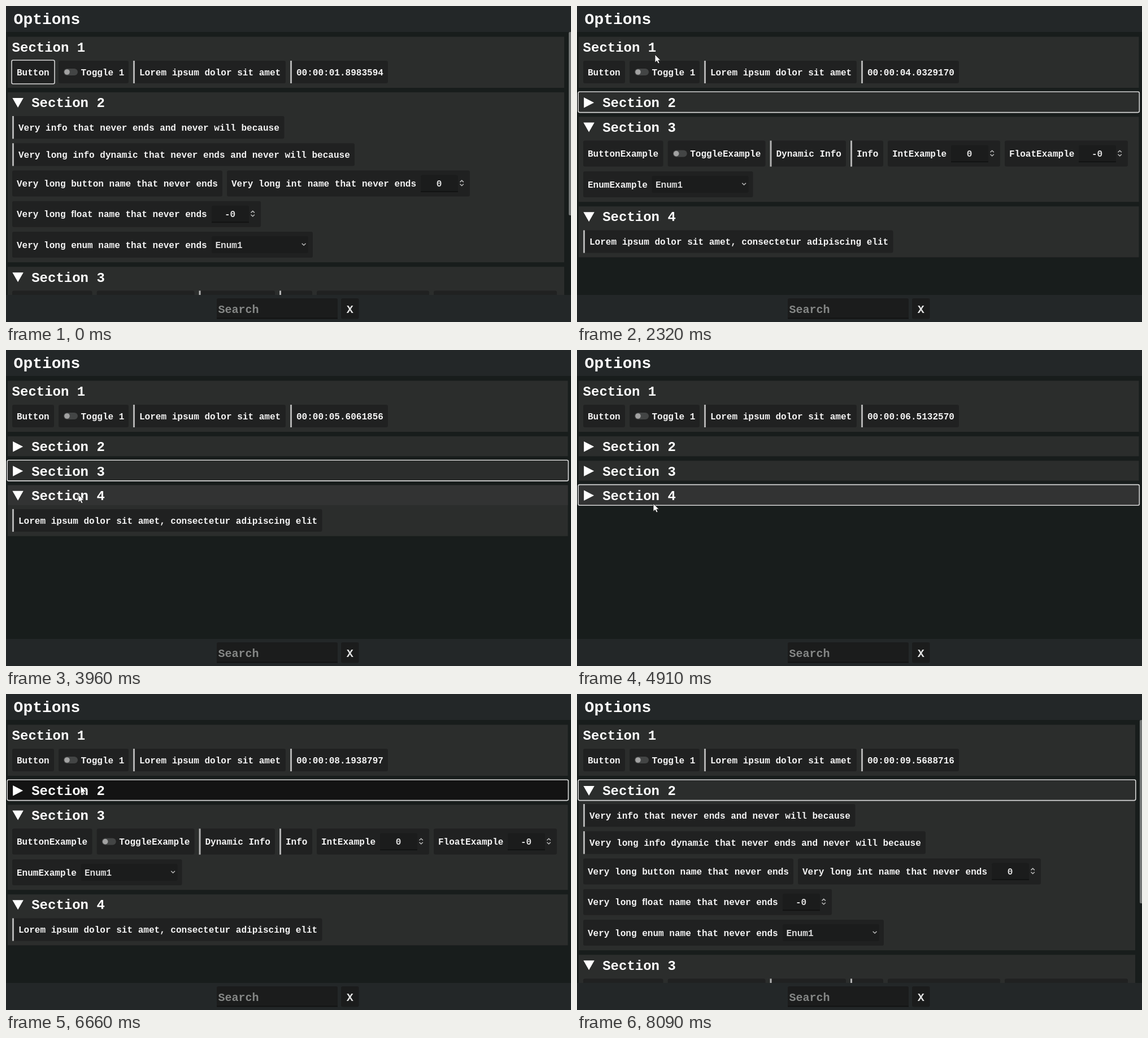
Animation of 1000 by 560 pixels, one loop 8.12 s. Source, as an HTML page:

```html
<!DOCTYPE html>
<html lang="en">
<head>
<meta charset="utf-8">
<title>Options</title>
<style>
html, body { margin: 0; width: 100%; height: 100%; overflow: hidden; background: #181d1c; }
svg { display: block; width: 1000px; height: 560px; }
text { font: bold 16.04px "Liberation Mono", "DejaVu Sans Mono", monospace; fill: #f4f4f4; white-space: pre; }
.title { font-size: 24px; fill: #fff; }
.page { font-size: 28px; fill: #fff; }
.search { font-size: 20px; fill: #858786; }
.close { font-size: 20px; fill: #e4e4e4; }
.value { fill: #dcdcdc; }
.panel { fill: #2b2d2c; }
.item { fill: #202121; }
.field { fill: #1b1c1c; }
.edge { fill: #121313; }
.bar { fill: #232728; }
.mark { fill: #b2b2b2; }
.icon { fill: none; stroke: #bcbcbc; stroke-width: 1.5; }
.focus { fill: none; stroke: #d6d6d6; stroke-width: 1.6; }
</style>
</head>
<body>
<svg id="stage" viewBox="0 0 1000 560"></svg>
<script>
const LOOP = 8120, TICK = 35, HEAD = 35.3, GAP = 8, TOP = 54.5;
const stage = document.getElementById('stage');

function add(parent, tag, attrs, label) {
  const el = document.createElementNS('http://www.w3.org/2000/svg', tag);
  for (const key in attrs) el.setAttribute(key, attrs[key]);
  if (label !== undefined) el.textContent = label;
  return parent.appendChild(el);
}
const rect = (g, cls, x, y, width, height, rx = 0) =>
  add(g, 'rect', { class: cls, x, y, width, height, rx });
const text = (g, label, x, y, cls = '') => add(g, 'text', { class: cls, x, y }, label);
const path = (g, d, attrs) => add(g, 'path', { d, ...attrs });

// Widgets: every one takes left, right, top and height inside its section.
function box(g, label, x, right, y, h, pad = 8) {
  const el = rect(g, 'item', x, y, right - x, h, 3);
  text(g, label, x + pad, y + h / 2 + 5.7);
  return el;
}
function info(g, label, x, right, y, h) {
  box(g, label, x, right, y, h, 11);
  rect(g, 'mark', x, y, 3, h);
  return g.lastChild.previousSibling;
}
function toggle(g, label, x, right, y, h) {
  const mid = y + h / 2;
  box(g, label, x, right, y, h, 39.5);
  rect(g, '', x + 9, mid - 6, 25, 12, 6).setAttribute('fill', '#434545');
  add(g, 'circle', { cx: x + 15, cy: mid, r: 4.8, fill: '#a2a2a2' });
}
function field(g, x, mid, w) {
  rect(g, 'field', x, mid - 15, w, 30, 3);
}
function spin(g, label, value, x, right, y) {
  const mid = y + 23, left = right - 87, tip = right - 14.3;
  box(g, label, x, right, y, 46);
  field(g, left, mid, 66);
  rect(g, 'edge', left, mid + 13.5, 66, 2);
  text(g, value, left + 32.5, mid + 5.7, 'value').setAttribute('text-anchor', 'middle');
  path(g, `M${tip - 3.2} ${mid - 2.3}l3.2 -3l3.2 3m-6.4 3.4l3.2 3l3.2 -3`, { class: 'icon' });
}
function choice(g, label, x, right, y) {
  const mid = y + 23;
  box(g, label, x, right, y, 46);
  field(g, right - 179, mid, 171);
  text(g, 'Enum1', right - 172.5, mid + 5.7, 'value');
  path(g, `M${right - 19.3} ${mid - 2.2}l3.4 3.2l3.4 -3.2`, { class: 'icon' });
}

function section(n, height) {
  const g = add(stage, 'g', {});
  const s = { n, height, g, panel: rect(g, 'panel', 3, 0, 985, height) };
  if (n > 1) {
    s.head = rect(g, '', 3, 0, 985, HEAD);
    s.arrow = path(g, '', { fill: '#fff' });
  }
  text(g, 'Section ' + n, n > 1 ? 45.2 : 10.6, 26.4, 'title');
  s.body = add(g, 'g', {});
  return s;
}

const sections = [section(1, 90.5), section(2, 301.2), section(3, 150.8), section(4, 90.2)];
const [one, two, three, four] = sections.map(s => s.body);

box(one, 'Button', 11, 85, 42.5, 40);
toggle(one, 'Toggle 1', 93, 217, 42.5, 40);
info(one, 'Lorem ipsum dolor sit amet', 225, 495, 42.5, 40);
const clock = info(one, '', 503, 676, 42.5, 40);

info(two, 'Very info that never ends and never will because', 11, 492.5, 42, 40.3);
info(two, 'Very long info dynamic that never ends and never will because', 11, 617, 90.2, 40.3);
const longButton = box(two, 'Very long button name that never ends', 11, 383, 138.4, 46);
spin(two, 'Very long int name that never ends', '0', 391, 821, 138.4);
spin(two, 'Very long \ufb02oat name that never ends', '-0', 11, 451, 192.7);
choice(two, 'Very long enum name that never ends', 11, 543, 247);

box(three, 'ButtonExample', 11, 152.5, 42.3, 46);
toggle(three, 'ToggleExample', 160.7, 333.5, 42.3, 46);
info(three, 'Dynamic Info', 341.5, 476, 42.3, 46);
info(three, 'Info', 484, 542, 42.3, 46);
spin(three, 'IntExample', '0', 550, 749, 42.3);
spin(three, 'FloatExample', '-0', 757, 975, 42.3);
choice(three, 'EnumExample', 11, 311.5, 96.7);

info(four, 'Lorem ipsum dolor sit amet, consectetur adipiscing elit', 11, 559.5, 42.3, 40.2);

const focus = rect(stage, 'focus', 0, 0, 0, 0, 2.5);
const scroll = add(stage, 'rect', { x: 996, y: 46, width: 5, height: 325, rx: 2, fill: '#747776' });

rect(stage, 'bar', 0, 0, 1000, 46);
text(stage, 'Options', 13.6, 31.6, 'page');
rect(stage, 'bar', 0, 512, 1000, 48);
rect(stage, 'field', 373, 518, 214, 36, 3);
rect(stage, 'edge', 373, 552.5, 214, 2);
text(stage, 'Search', 375.5, 543.8, 'search');
rect(stage, 'field', 593, 518, 31.5, 36.5, 3);
text(stage, 'X', 602.7, 543.8, 'close');
const pointer = path(stage, 'M0 0V14.2L3.3 11.2L5.6 16L8 14.9L5.8 10.2H10Z',
  { fill: '#fff', stroke: '#1c1c1c', 'stroke-width': 0.9 });

// Time, x, y of the pointer.
const route = [
  [350, 678, 562], [840, 192, 319], [1330, 143, 162], [1700, 141, 168], [1950, 141, 168],
  [2320, 138, 85], [2530, 136, 76], [2700, 136, 76], [3050, 134, 214], [3300, 134, 214],
  [3650, 130, 287], [3960, 127.5, 256], [4400, 130, 258], [4910, 135, 272], [5200, 134, 262],
  [5450, 134, 262], [5900, 134, 222], [6250, 133, 216], [6500, 132, 163], [6660, 132, 163],
  [6720, 146, 168], [7400, 920, 562]
];
// Section, press time, release time.
const clicks = [
  [2, 1800, 1880], [3, 3110, 3200], [4, 4150, 4240],
  [4, 5250, 5340], [3, 6090, 6180], [2, 6580, 6690]
];
// Tick and clock reading in seconds.
const readings = [
  [0, 1.8983594], [38, 3.0851597], [66, 4.0329170], [113, 5.6061856],
  [140, 6.5132570], [190, 8.1938797], [231, 9.5688716]
];

function sample(rows, at, ease = u => u) {
  let i = 0;
  while (i < rows.length - 2 && at >= rows[i + 1][0]) i++;
  const a = rows[i], b = rows[i + 1];
  const u = ease((at - a[0]) / (b[0] - a[0]));
  return a.slice(1).map((v, j) => v + (b[j + 1] - v) * u);
}
const soft = u => (u + u * u * (3 - 2 * u)) / 2;

function pointerAt(t) {
  if (t < route[0][0] || t > route[route.length - 1][0]) return null;
  return sample(route, t, soft);
}

function draw(now) {
  const tick = Math.floor((now % LOOP) / TICK), t = tick * TICK;
  const pos = pointerAt(t), felt = pointerAt(t - TICK) && pos;
  const over = (x, y, w, h) =>
    felt && felt[0] >= x && felt[0] < x + w && felt[1] >= y && felt[1] < y + h;
  const isOpen = n => clicks.filter(c => c[0] === n && t >= c[2]).length % 2 === 0;
  const pressed = clicks.find(c => t >= c[1] && t < c[2]);
  const last = clicks.filter(c => t >= c[1]).pop();
  const width = isOpen(2) ? 985 : 991.5;

  let y = TOP;
  for (const s of sections) {
    const open = isOpen(s.n), h = open ? s.height : HEAD;
    s.g.setAttribute('transform', `translate(0 ${y.toFixed(2)})`);
    s.panel.setAttribute('width', width);
    s.panel.setAttribute('height', h);
    s.body.style.display = open ? '' : 'none';
    if (s.head) {
      const down = pressed && pressed[0] === s.n;
      s.head.setAttribute('width', width);
      s.head.setAttribute('fill', down ? '#131313' : over(3, y, width, HEAD) ? '#323333' : 'none');
      s.arrow.setAttribute('d', open ? 'M11.4 10.1H30.8L21.1 27.1Z' : 'M12.2 9V27.5L30.2 18.2Z');
    }
    s.y = y;
    y += h + GAP;
  }

  const ring = last
    ? [2.2, sections[last[0] - 1].y - 1, width + 1.6, HEAD + 1.3]
    : [10, 96, 76, 42];
  ['x', 'y', 'width', 'height'].forEach((k, i) => focus.setAttribute(k, ring[i]));
  scroll.style.display = isOpen(2) ? '' : 'none';

  const warm = isOpen(2) && over(11, sections[1].y + 138.4, 372, 46);
  longButton.style.fill = warm ? '#343434' : '';

  const seconds = sample(readings, tick)[0];
  clock.textContent = '00:00:' + seconds.toFixed(7).padStart(10, '0');

  pointer.style.display = pos ? '' : 'none';
  if (pos) pointer.setAttribute('transform', `translate(${Math.round(pos[0])} ${Math.round(pos[1])})`);
}

const start = performance.now();
function loop() {
  draw(performance.now() - start);
  requestAnimationFrame(loop);
}
loop();
</script>
</body>
</html>
```
